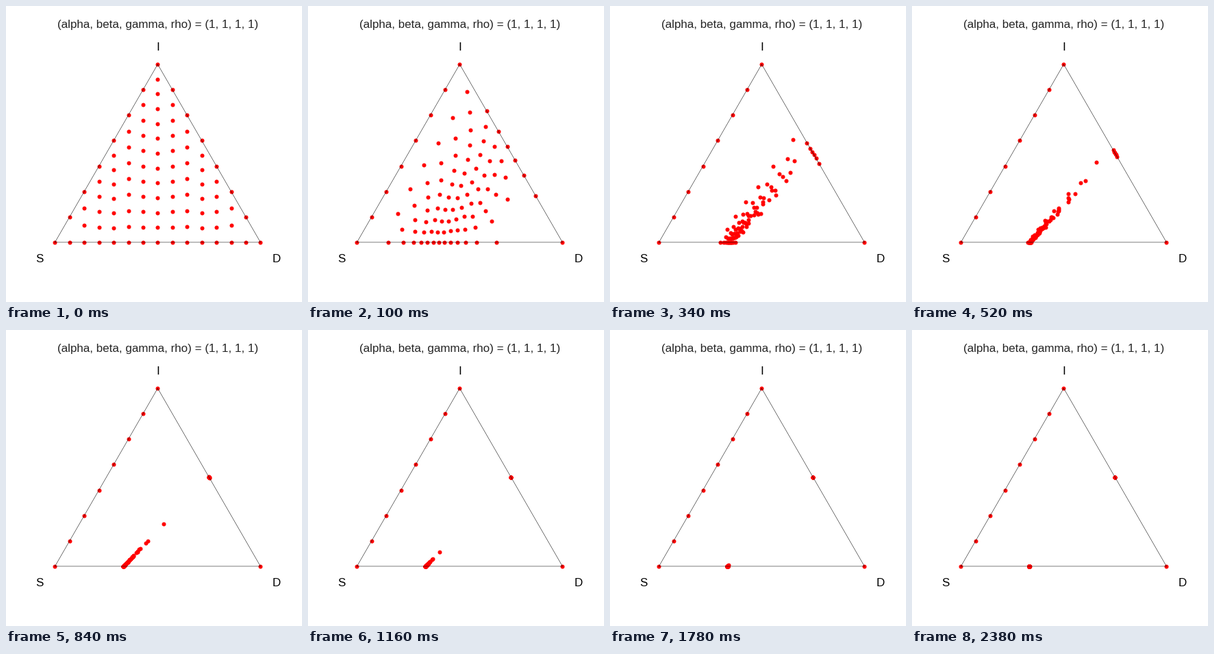
A matplotlib script for the animation above (2.4 s loop, 432 by 432 pixels).

```python
import numpy as np
import matplotlib.pyplot as plt
from matplotlib.animation import FuncAnimation

SIZE, DPI = 432, 72
FRAMES, INTERVAL = 120, 20
T_END = 30.0
SUBSTEPS = 8
S, D, I = np.array([[71.4, 344.9], [371.4, 344.9], [221.4, 85.1]])

plt.rcParams["font.family"] = "Liberation Sans"


def start_grid():
    """Columns of evenly spaced points filling the simplex, as (s, i, d)."""
    rows = []
    for k in range(15):
        m = min(k, 14 - k)
        count = max(1, int(13 * m / 7 + 0.6))
        for i in np.linspace(0, m / 7, count):
            d = k / 14 - i / 2
            rows.append((1 - i - d, i, d))
    p = np.array(rows)
    p[np.abs(p) < 1e-9] = 0
    return p


def flow(p):
    """Replicator equation with payoffs 2d, d and s + i."""
    s, i, d = p.T
    fit = np.column_stack([2 * d, d, s + i])
    mean = (p * fit).sum(axis=1, keepdims=True)
    return p * (fit - mean)


def rk4(p, h):
    a = flow(p)
    b = flow(p + h / 2 * a)
    c = flow(p + h / 2 * b)
    e = flow(p + h * c)
    return p + h / 6 * (a + 2 * b + 2 * c + e)


def solve():
    h = T_END / (FRAMES - 1) / SUBSTEPS
    p = start_grid()
    path = [p]
    for _ in range(FRAMES - 1):
        for _ in range(SUBSTEPS):
            p = rk4(p, h)
        path.append(p)
    return np.array(path) @ np.array([S, I, D])


path = solve()

fig = plt.figure(figsize=(SIZE / DPI, SIZE / DPI), dpi=DPI, facecolor="white")
ax = fig.add_axes([0, 0, 1, 1])
ax.set(xlim=(0, SIZE), ylim=(SIZE, 0))
ax.axis("off")

dots = ax.scatter(*path[0].T, s=25, c="red", linewidths=1, zorder=1)
ax.plot(*np.array([S, I, D, S]).T, color="black", lw=0.5, zorder=2)


def label(x, y, text, color="black"):
    ax.text(x, y, text, size=17, color=color, ha="center", va="baseline")


label(222, 32, "(alpha, beta, gamma, rho) = (1, 1, 1, 1)", "0.15")
label(222, 65, "I")
label(48.5, 374, "S")
label(395, 374, "D")


def draw(n):
    dots.set_offsets(path[n])
    return (dots,)


anim = FuncAnimation(fig, draw, frames=FRAMES, interval=INTERVAL,
                     repeat=True, repeat_delay=0, blit=False)
plt.show()
```
